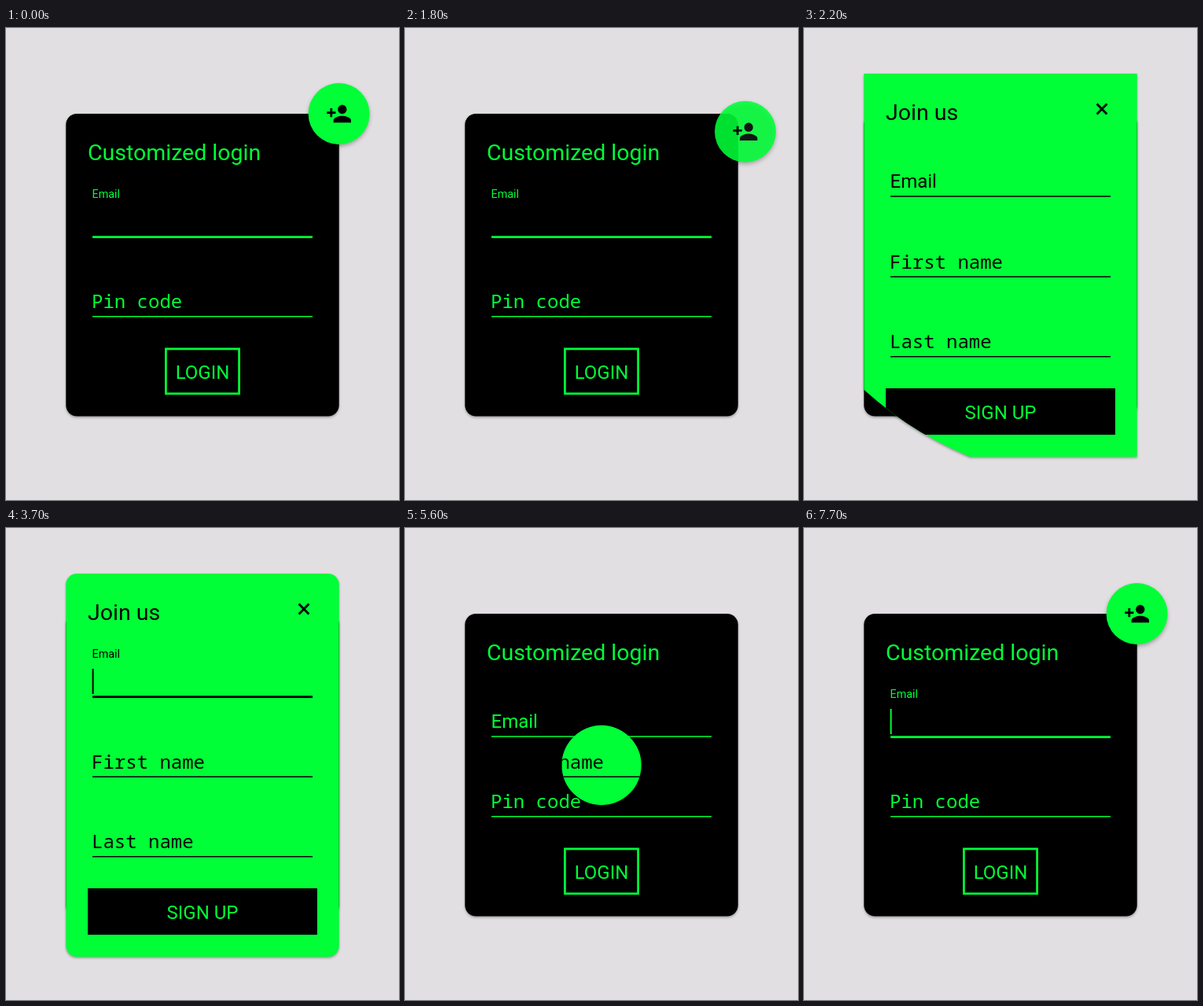
An HTML page with a canvas for the animation above (7800 ms loop, 500x600 px).

```html
<!DOCTYPE html>
<html lang="en">
<head>
<meta charset="utf-8">
<title>Login card</title>
<style>
html, body { margin: 0; width: 100%; height: 100%; overflow: hidden; background: #e1dfe2; }
canvas { display: block; }
</style>
</head>
<body>
<canvas id="stage" width="500" height="600"></canvas>
<script>
const W = 500, H = 600, LOOP = 7800, STEP = 100;
const GREEN = '#00ff37', BLACK = '#000', BACK = '#e1dfe2';
const SANS = 'Roboto, sans-serif', MONO = '"Noto Sans Mono", monospace';
const LOGIN = { x: 76.3, y: 109, w: 347.4, h: 384.5 };
const JOIN = { x: 76.3, y: 58, w: 347.4, h: 487 };
const FAB = { x: 423.6, y: 109, r: 39 };
const REVEAL = { x: 388, y: 116, start: 1857, time: 500 };
const HIDE = { x: 250, y: 301.5, start: 5194, time: 500 };
const FULL = Math.hypot(JOIN.w, JOIN.h);
const LOGIN_CARET = [[200, 700], [1200, 1700], [5700, 6200], [6700, 7300], [7700, 7800]];
const JOIN_CARET = [[2700, 3200], [3700, 4200], [4700, 5100]];
const PERSON = new Path2D('M15 12c2.21 0 4-1.79 4-4s-1.79-4-4-4-4 1.79-4 4 1.79 4 4 4z' +
  'm-9-2V7H4v3H1v2h3v3h2v-3h3v-2H6z' +
  'm9 4c-2.67 0-8 1.34-8 4v2h16v-2c0-2.66-5.33-4-8-4z');

const screen = document.getElementById('stage').getContext('2d');
const layer = document.createElement('canvas');
layer.width = W;
layer.height = H;
const g = layer.getContext('2d');

const progress = (t, start, time) => Math.min(1, Math.max(0, (t - start) / time));
const ease = p => (1 - Math.cos(Math.PI * p)) / 2;
const within = (t, spans) => spans.some(([a, b]) => t >= a && t < b);

// Paints one surface off screen, then places it with its shadow.
function surface(paint, { blur, drop, shade, alpha = 1 }) {
  g.clearRect(0, 0, W, H);
  g.save();
  paint();
  g.restore();
  screen.save();
  screen.globalAlpha = alpha;
  screen.shadowColor = `rgba(0,0,0,${shade})`;
  screen.shadowBlur = blur;
  screen.shadowOffsetY = drop;
  screen.drawImage(layer, 0, 0);
  screen.restore();
}

function text(str, x, y, size, family = SANS, align = 'left') {
  g.font = `${size}px ${family}`;
  g.textAlign = align;
  g.fillText(str, x, y);
}

function card(box, radius, color) {
  g.fillStyle = color;
  g.beginPath();
  g.roundRect(box.x, box.y, box.w, box.h, radius);
  g.fill();
}

function circle(x, y, r) {
  g.beginPath();
  g.arc(x, y, r, 0, Math.PI * 2);
}

const underline = (y, thick) => g.fillRect(110, y, 280, thick);

function field(label, base) {
  text(label, 109, base, 24, MONO);
  underline(base + 10, 1.5);
}

// p: 0 = label resting in the field, 1 = label floating above it
function emailField(base, p, caret) {
  text('Email', 109.5, base - 38 * p, 24 - 9.7 * p);
  underline(base + 10.3, p > 0 ? 2.8 : 1.5);
  if (caret) g.fillRect(109.6, base - 24, 2, 32);
}

function drawLogin(t) {
  const p = t < 3000 ? 1 : ease(progress(t, 5680, 200));
  surface(() => {
    card(LOGIN, 14, BLACK);
    g.fillStyle = g.strokeStyle = GREEN;
    text('Customized login', 104, 167.5, 28.5);
    emailField(254, p, within(t, LOGIN_CARET));
    field('Pin code', 356);
    g.lineWidth = 2.8;
    g.strokeRect(203.4, 407.9, 93.2, 56.9);
    text('LOGIN', 250, 446, 24, SANS, 'center');
  }, { blur: 3, drop: 1.5, shade: 0.35 });
}

function drawJoin(t) {
  const opening = t < 4000;
  const hole = opening ? REVEAL : HIDE;
  const p = ease(progress(t, hole.start, hole.time));
  const radius = FULL * (opening ? p : 1 - p);
  if (radius < 1) return;
  const round = t >= 2450 && t < 5250;
  surface(() => {
    if (!round) {
      circle(hole.x, hole.y, radius);
      g.clip();
    }
    card(JOIN, round ? 14 : 0, GREEN);
    g.fillStyle = g.strokeStyle = BLACK;
    text('Join us', 104, 117, 28.5);
    emailField(203, ease(progress(t, 2680, 200)), within(t, JOIN_CARET));
    field('First name', 305.5);
    field('Last name', 407);
    g.fillRect(104, 458, 292, 59);
    if (t < 5200) {
      g.lineWidth = 2.8;
      g.beginPath();
      g.moveTo(372.6, 96.6);
      g.lineTo(385.4, 109.4);
      g.moveTo(385.4, 96.6);
      g.lineTo(372.6, 109.4);
      g.stroke();
    }
    g.fillStyle = GREEN;
    text('SIGN UP', 250, 497, 24, SANS, 'center');
  }, { blur: 3, drop: 1.5, shade: 0.35 });
}

// Half a turn clockwise, then a straight run to the reveal point.
function fabPath(p) {
  const cx = 388, cy = 137;
  const r = Math.hypot(FAB.x - cx, FAB.y - cy);
  const from = Math.atan2(FAB.y - cy, FAB.x - cx);
  const turn = Math.min(1, p / 0.7) * Math.PI;
  const x = cx + r * Math.cos(from + turn);
  const y = cy + r * Math.sin(from + turn);
  const q = Math.max(0, (p - 0.7) / 0.3);
  return [x + (REVEAL.x - x) * q, y + (REVEAL.y - y) * q];
}

function drawFab(t) {
  let x = FAB.x, y = FAB.y, scale = 1, alpha = 1;
  if (t < 4000) {
    const p = progress(t, 1660, 400) ** 2;
    [x, y] = fabPath(p);
    alpha = 1 - p;
  } else {
    scale = alpha = ease(progress(t, 5690, 260));
  }
  if (alpha <= 0) return;
  surface(() => {
    g.translate(x, y);
    g.scale(scale, scale);
    g.fillStyle = GREEN;
    circle(0, 0, FAB.r);
    g.fill();
    g.scale(1.4, 1.4);
    g.translate(-12, -12);
    g.fillStyle = BLACK;
    g.fill(PERSON);
  }, { blur: 5, drop: 2.5, shade: 0.3, alpha });
}

function frame() {
  const t = Math.floor(performance.now() % LOOP / STEP) * STEP;
  screen.fillStyle = BACK;
  screen.fillRect(0, 0, W, H);
  drawLogin(t);
  if (t >= REVEAL.start && t < HIDE.start + HIDE.time) drawJoin(t);
  drawFab(t);
  requestAnimationFrame(frame);
}
frame();
</script>
</body>
</html>
```
